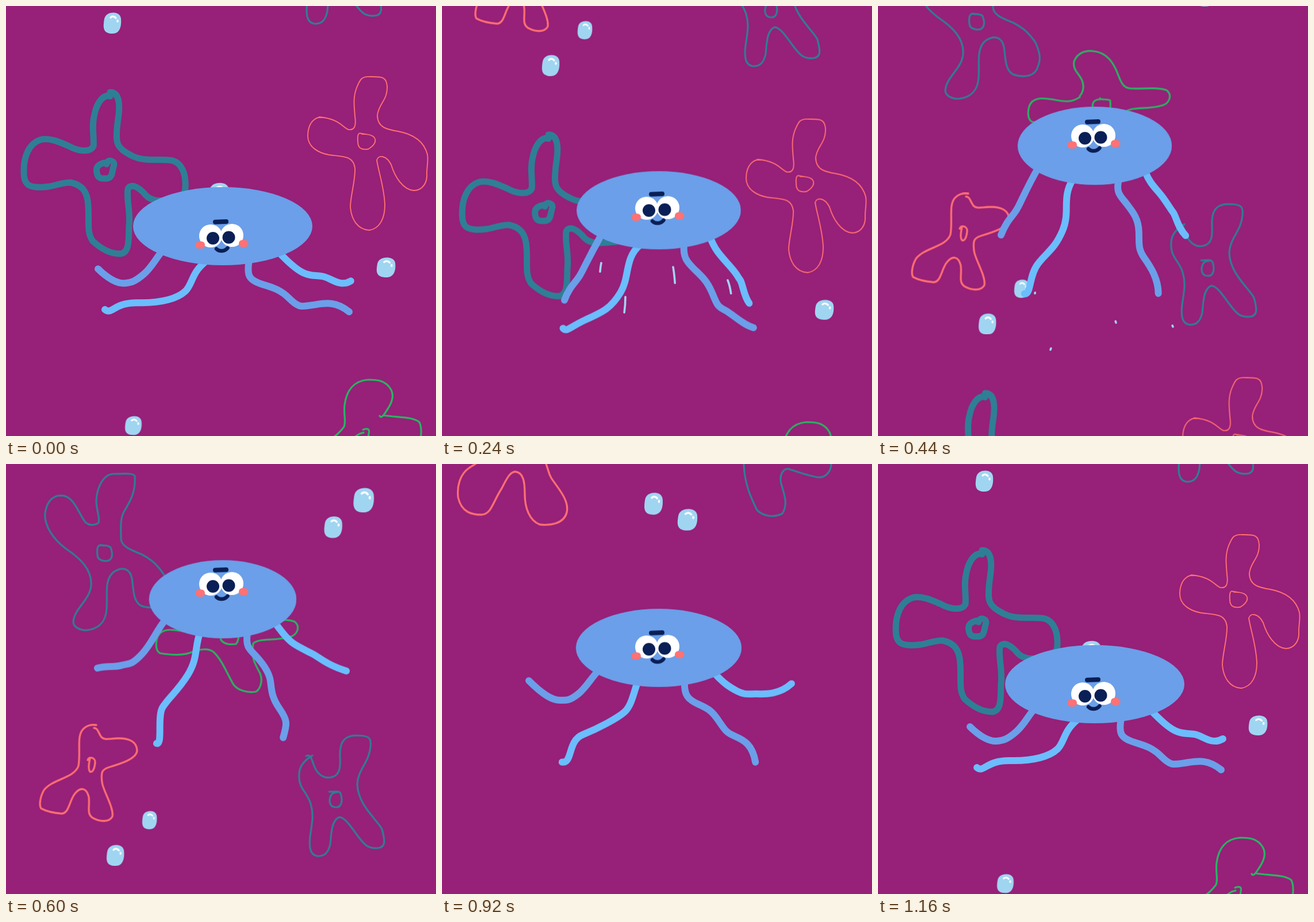
Write an HTML page without scripts that moves like this. It is 748 px wide and 748 px high and loops after 1.2 s.

```html
<!DOCTYPE html>
<html lang="en">
<head>
<meta charset="utf-8">
<title>Swimming jellyfish</title>
<style>
  html, body { margin: 0; height: 100%; overflow: hidden; background: #972078; }
  svg { display: block; width: 100vw; height: 100vh; }
  path { fill: none; stroke-linecap: round; stroke-linejoin: round; }

  .teal { stroke: #2e7f96; stroke-width: 3.2; }
  .coral { stroke: #ff7072; stroke-width: 3.3; }
  .green { stroke: #27b562; stroke-width: 3.2; }
  .thick { stroke-width: 11; }
  .thin { stroke-width: 1.9; }
  .blob { fill: #a0d5f2; }
  .shine { stroke: #fff; stroke-width: 3.2; }
  .dark { stroke: #6b9fe9; }
  .light { stroke: #6bbdfd; }
  .ink { stroke: #0a1f56; }

  #sea, #jelly, #bell, #face, .leg, .dash { animation: 1.2s linear infinite; }
  .leg { stroke-width: 12; }
  #sea { animation-name: scroll; }
  #jelly { animation-name: swim; }
  #bell { animation-name: squash; transform-origin: 377px 383px; fill: #6b9fe9; }
  #face { animation-name: look; }
  .dash { animation-name: whoosh; stroke: #a0d5f2; stroke-width: 3.6; stroke-dasharray: 1 3; }
  #leg1 { animation-name: leg1; }
  #leg2 { animation-name: leg2; }
  #leg3 { animation-name: leg3; }
  #leg4 { animation-name: leg4; }

  /* one lap of the sea is 2479px */
  @keyframes scroll {
    0% { transform: translate(0, 0); }
    13.333% { transform: translate(3.7px, -12.5px); animation-timing-function: cubic-bezier(.5, 0, .75, .65); }
    26.667% { transform: translate(5.2px, 316px); animation-timing-function: cubic-bezier(.25, .55, .65, .85); }
    50% { transform: translate(5.2px, 650px); animation-timing-function: cubic-bezier(.4, .3, .75, .65); }
    63.333% { transform: translate(5.2px, 899px); animation-timing-function: cubic-bezier(.35, .2, .7, .65); }
    76.667% { transform: translate(2px, 1549px); animation-timing-function: cubic-bezier(.25, .4, .5, 1); }
    96.667%, 100% { transform: translate(0, 2479px); }
  }
  @keyframes swim {
    0% { transform: translateY(0); animation-timing-function: cubic-bezier(.8, 0, .2, 1); }
    50% { transform: translateY(-148px); }
    96.667%, 100% { transform: translateY(0); }
  }
  @keyframes squash {
    0%, 96.667%, 100% { transform: scaleX(1); }
    13.333% { transform: scaleX(.944); }
    26.667% { transform: scaleX(.889); }
    50% { transform: scaleX(.822); }
  }
  @keyframes look {
    0%, 96.667%, 100% { transform: translateY(0); }
    13.333% { transform: translateY(-14px); }
    26.667% { transform: translateY(-27px); }
    50% { transform: translateY(-43.5px); }
  }
  @keyframes whoosh {
    0%, 18% { stroke-dashoffset: 1; opacity: 0; }
    18.1% { stroke-dashoffset: 1; opacity: 1; }
    25%, 28% { stroke-dashoffset: 0; opacity: 1; }
    37% { stroke-dashoffset: -1; opacity: 1; }
    37.1%, 100% { stroke-dashoffset: -1; opacity: 0; }
  }
  @keyframes leg1 {
    0%, 96.667%, 100% { d: path("M274 424C262 436 255 453 240 466S218 481 206 482S177 474 160 457"); }
    13.333% { d: path("M276 426C262 444 250 472 234 489S216 502 204 506S182 511 169 513"); }
    26.667% { d: path("M279 424C272 444 264 454 263 470S265 491 262 505S254 536 256 565"); }
    50% { d: path("M278 418C262 436 254 460 236 479S215 494 201 498S178 498 159 503"); }
    63.333% { d: path("M274 422C262 432 252 452 237 465S214 480 203 481S172 471 149 461"); }
    76.667% { d: path("M274 421C262 431 252 451 237 463S217 474 205 474S178 467 151 440"); }
  }
  @keyframes leg2 {
    0%, 96.667%, 100% { d: path("M348 444C322 464 325 484 312 496S272 517 230 516S184 538 172 528"); }
    13.333% { d: path("M350 444C322 454 318 490 296 509S256 542 219 543S171 543 171 530"); }
    26.667% { d: path("M340 442C312 478 336 506 325 542S303 577 282 602S262 647 249 645"); }
    50% { d: path("M337 442C328 468 334 486 316 515S281 556 272 572S273 637 262 634"); }
    63.333% { d: path("M338 444C334 466 330 482 318 491S280 521 261 540S261 598 249 599"); }
    76.667% { d: path("M340 443C334 459 330 483 318 494S272 523 245 534S228 584 209 582"); }
  }
  @keyframes leg3 {
    0%, 96.667%, 100% { d: path("M474 428C490 444 504 458 517 464S535 468 550 470S580 490 600 478"); }
    13.333% { d: path("M470 428C482 446 484 458 506 472S530 486 540 493S556 515 578 526"); }
    26.667% { d: path("M463 432C468 458 482 462 492 484S496 506 497 514S493 546 492 563"); }
    50% { d: path("M468 424C480 440 490 454 503 462S524 473 535 479S558 497 592 508"); }
    63.333% { d: path("M470 424C490 444 500 454 513 459S535 466 545 469S585 476 608 467"); }
    76.667% { d: path("M472 425C490 445 500 451 513 458S533 463 545 463S585 466 608 445"); }
  }
  @keyframes leg4 {
    0%, 96.667%, 100% { d: path("M423 442C418 470 424 476 440 482S474 490 492 508S514 523 534 520S572 512 597 532"); }
    13.333% { d: path("M424 442C427 466 432 476 448 486S472 500 490 514S512 530 530 530S558 535 593 521"); }
    26.667% { d: path("M418 442C411 464 420 470 431 486S449 510 449 536S444 568 454 582S486 626 492 652"); }
    50% { d: path("M420 442C416 466 424 470 435 482S458 510 460 526S462 554 476 574S489 600 482 624"); }
    63.333% { d: path("M422 442C421 464 426 470 440 479S464 496 474 516S484 534 494 546S506 570 500 592"); }
    76.667% { d: path("M422 443C421 465 428 473 446 481S470 493 482 511S496 531 510 537S540 551 545 582"); }
  }
</style>
</head>
<body>
<svg viewBox="0 0 748 748">
  <defs>
    <g id="bubble">
      <path class="blob" d="M-8 -16C2 -21 14 -18 15 -8C16 4 14 18 0 18C-14 18 -16 10 -15 0C-14 -8 -14 -12 -8 -16Z"/>
      <path class="shine" d="M-3 -10C0 -13 4 -12 6 -9M9 -5V-3"/>
    </g>

    <g id="reef">
      <path class="teal thick" d="M181 156C164 154 156 178 154 188C148 210 154 228 152 244C146 256 124 252 110 244C96 238 78 229 62 232C40 238 30 262 31 290C31 310 40 314 52 315C80 317 92 307 112 307C132 311 142 322 143 348C145 376 140 394 151 409C164 421 180 431 198 431C216 430 213 404 214 382C217 360 209 335 212 318C218 306 234 318 243 329C254 341 270 339 290 337C309 338 313 324 312 306C311 286 302 269 284 268C262 266 238 271 218 260C192 247 191 238 193 214C194 196 199 184 196 166C194 154 188 150 181 150V157"/>
      <path class="teal thick" d="M176 272C160 274 156 280 158 290C160 302 168 300 176 300C186 298 184 288 188 276C188 268 176 266 175 275"/>

      <path class="coral thin" d="M554 194H543C530 198 525 212 525 226C525 246 545 256 562 259C586 262 604 260 607 282C608 304 599 330 599 350C601 372 612 389 632 390C650 387 659 370 659 346C658 316 648 288 645 268C648 258 662 260 670 276C676 296 690 320 710 321C726 320 733 306 732 292C732 276 735 270 733 258C726 232 704 222 682 218C664 215 646 212 646 190C648 170 664 164 663 140C662 122 652 123 634 123C618 122 616 128 610 142C603 160 606 176 607 192C610 212 604 216 596 215C586 212 580 196 545 193"/>
      <path class="coral thin" d="M620 223C613 218 611 224 612 236C612 250 622 250 630 249C642 242 645 234 640 228C634 222 626 224 619 222"/>

      <g transform="translate(-5.2 -316)">
        <path class="coral" d="M157 119C140 117 130 126 128 140C126 156 129 172 126 190C118 212 82 212 66 232C58 246 58 260 61 264C72 270 84 272 97 273C110 272 110 250 120 238C130 226 140 228 144 244C146 262 140 272 150 280C164 288 180 288 185 278C188 262 168 232 167 218C165 202 166 196 180 192C200 186 226 178 228 164C228 148 214 142 196 142C180 142 172 146 166 140C160 132 160 124 153 124"/>
        <path class="coral" d="M142 180C144 172 156 176 155 184C154 196 150 202 146 200C141 194 146 180 146 176"/>
        <path class="teal" d="M522 173C530 168 532 180 536 190C542 206 554 212 564 210C580 208 582 194 581 176C580 154 584 138 608 137C630 137 636 140 634 156C632 184 612 196 611 222C612 258 646 284 654 300C660 322 660 332 646 333C630 334 624 328 612 312C600 296 590 280 580 279C566 284 566 308 564 326C560 344 552 347 542 347C528 345 527 330 529 312C532 290 536 276 530 256C524 236 508 228 510 206C509 190 522 178 533 172"/>
        <path class="teal" d="M562 235C576 234 580 234 582 238C586 250 584 262 574 262C562 262 562 250 564 244C566 238 570 236 576 236"/>
      </g>

      <g transform="translate(-5.2 -650)">
        <path class="teal" d="M102 54H90C76 58 70 70 68 84C66 104 80 128 104 146C128 162 150 182 148 210C146 236 118 250 117 274C118 284 130 288 140 288C158 286 174 276 175 250C177 226 170 200 188 186C204 176 216 182 219 198C222 214 220 236 234 245C246 250 268 252 276 237C286 216 280 206 274 190C260 170 248 162 236 156C216 148 200 142 200 128C200 110 198 96 205 82C214 66 226 50 224 20C222 14 206 16 188 16C168 16 158 42 157 62C157 80 164 92 161 101C154 106 144 106 138 100C126 86 118 50 92 54"/>
        <path class="teal" d="M168 140C158 138 158 148 159 158C160 168 174 168 178 167C188 162 184 150 182 144C176 138 168 142 164 140"/>
      </g>

      <g transform="translate(-5.2 -899)">
        <path class="green" d="M351 532C358 524 358 516 356 508C352 494 338 488 341 472C346 458 360 452 374 454C398 456 410 474 418 496C424 512 428 518 440 519C464 520 486 516 502 522C512 530 508 546 492 549C468 556 440 550 430 560C426 584 432 594 442 612C448 628 440 642 434 644C420 646 404 642 396 632C384 612 376 588 360 574C350 568 340 570 326 574C308 582 288 580 268 577C258 572 260 550 268 542C278 534 290 536 304 538C324 542 336 544 351 534"/>
        <path class="green" d="M386 538C374 538 372 546 374 554C380 562 390 562 400 561C406 554 404 546 404 540C398 536 388 540 386 536"/>
      </g>

      <path class="green" d="M650 713C653 719 658 710 664 701C674 686 674 674 669 666C660 652 648 650 630 650C604 652 592 670 589 694C587 712 592 722 588 732C574 750 564 756 546 755C520 754 490 750 462 754C436 760 430 780 440 796C470 812 540 790 575 800C600 820 600 850 630 852C664 850 650 800 672 778C690 770 712 774 720 762C722 748 724 734 719 724C708 714 680 716 657 712"/>
      <path class="green" d="M621 737C630 734 633 736 631 744C630 756 622 766 606 766C598 760 602 752 612 746C618 742 620 743 622 742"/>

      <g transform="translate(-2 930)">
        <path class="coral" d="M48 0C30 12 26 34 28 52C34 78 52 82 68 82C86 82 88 60 104 36C112 20 118 8 127 7C142 8 144 26 144 46C144 70 152 92 170 99C188 101 212 98 217 78C222 56 200 34 190 18C184 8 186 4 178 -14C170 -50 200 -110 150 -112C100 -112 120 -40 48 0Z"/>
        <path class="teal" d="M525 -6C526 28 538 54 548 74C558 84 576 88 592 80C602 64 596 48 590 28C586 12 594 2 602 2C620 8 636 14 654 17C670 18 676 4 677 -4C676 -40 640 -30 630 -60C624 -100 560 -110 556 -70C556 -40 526 -40 525 -6Z"/>
        <use href="#bubble" transform="translate(368 63) scale(1.05)"/>
        <use href="#bubble" transform="translate(427 91) scale(1.13 1.03)"/>
      </g>

      <use href="#bubble" transform="translate(185 30)"/>
      <use href="#bubble" transform="translate(370.5 326.5) scale(1.13 1.03)"/>
      <use href="#bubble" transform="translate(661 455) scale(1.07 .95)"/>
      <use href="#bubble" transform="translate(221.5 730) scale(.95 .9)"/>
      <use href="#bubble" transform="translate(244.5 -31.5) scale(.84 .87)"/>
      <use href="#bubble" transform="translate(564 -541) scale(1.03)"/>
      <use href="#bubble" transform="translate(617 -588) scale(1.17)"/>
    </g>
  </defs>

  <rect width="748" height="748" fill="#972078"/>

  <g id="sea">
    <use href="#reef"/>
    <use href="#reef" y="-2479"/>
  </g>

  <path class="dash" pathLength="1" d="M277 447C273 466 276 482 273 500"/>
  <path class="dash" pathLength="1" d="M319 506C319 540 310 570 300 598"/>
  <path class="dash" pathLength="1" d="M402 454C408 488 404 520 414 551"/>
  <path class="dash" pathLength="1" d="M497 477C507 502 502 532 513 558"/>

  <g id="jelly">
    <path class="leg light" id="leg2"/>
    <path class="leg light" id="leg3"/>
    <path class="leg dark" id="leg1"/>
    <path class="leg dark" id="leg4"/>
    <ellipse id="bell" cx="377" cy="383" rx="156" ry="68"/>
    <g id="face">
      <path class="ink" stroke-width="8" d="M364 375.7L383 375"/>
      <g fill="#fff">
        <circle cx="356" cy="400" r="20"/>
        <circle cx="393" cy="399" r="20"/>
      </g>
      <g fill="#0a1f56">
        <circle cx="360" cy="404" r="11"/>
        <circle cx="387.500" cy="402.500" r="11"/>
      </g>
      <g fill="#ff7174">
        <rect x="329.500" y="409.500" width="16.500" height="12.500" rx="6"/>
        <rect x="405" y="407" width="16.500" height="12.500" rx="6"/>
      </g>
      <path class="ink" stroke-width="6.500" d="M366 422.500C371 427.500 380 427.500 385.500 421"/>
    </g>
  </g>
</svg>
</body>
</html>
```
